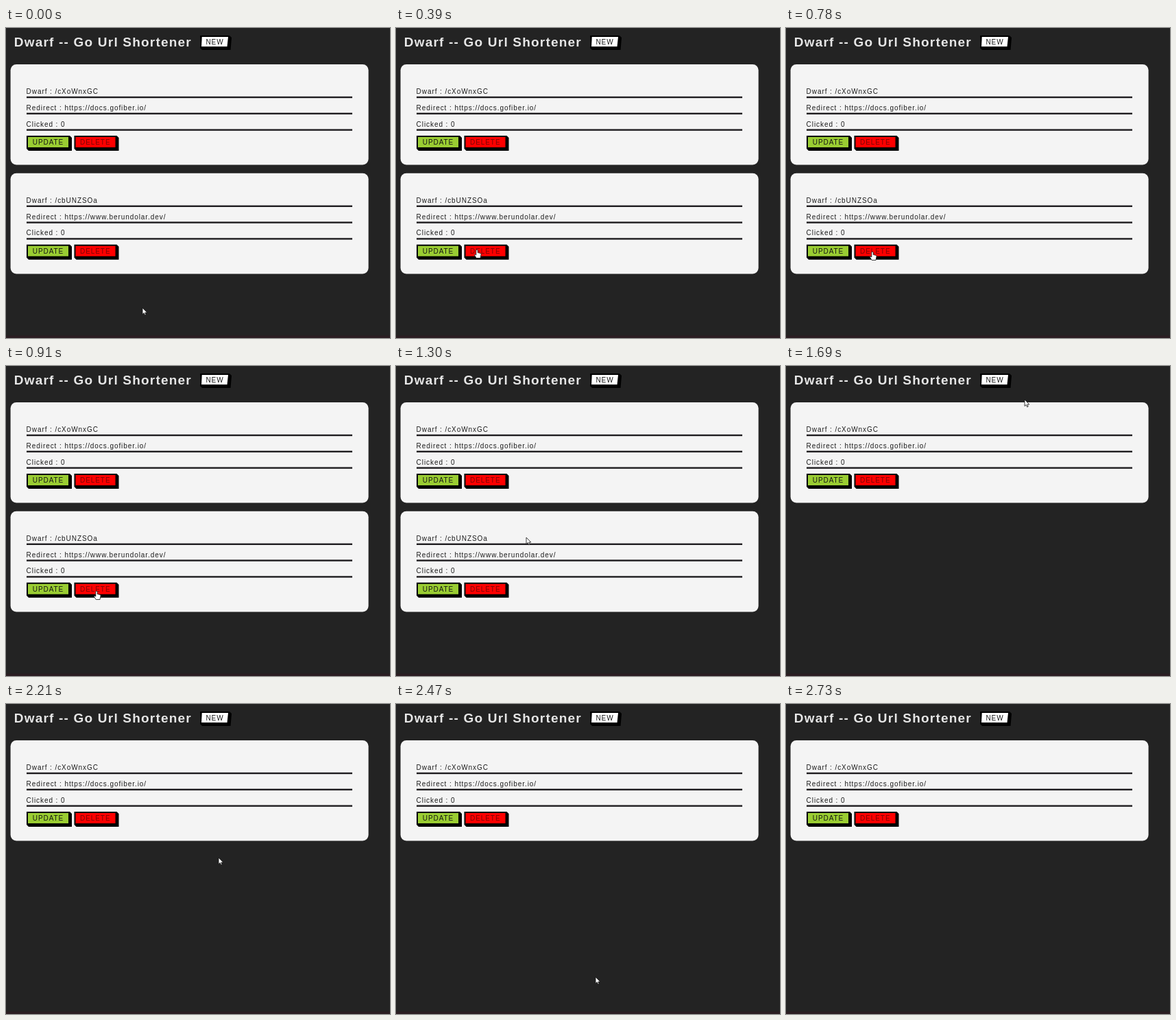
Recreate the animation shown at these times as an HTML page. Size 560 px wide and 452 px high, loop 3120 ms.

```html
<!DOCTYPE html>
<html lang="en">
<head>
<meta charset="utf-8">
<title>Dwarf</title>
<style>
  html, body { margin: 0; width: 100%; height: 100%; overflow: hidden; background: #232323; }
  svg { display: block; width: 560px; height: 452px; font: 10px "Liberation Sans", Arial, sans-serif; letter-spacing: .93px; fill: #1d1d1d; }
  .title { font-size: 19px; font-weight: bold; letter-spacing: 1.2px; fill: #e6e6e6; }
  .card { fill: #f4f4f4; }
  .rule { fill: #1f1d20; }
  .pointer { fill: #fff; stroke: #111; stroke-width: .8; stroke-linejoin: round; }
</style>
</head>
<body>
<svg id="stage" viewBox="0 0 560 452"></svg>
<script>
const LOOP = 3120, STEP = 130, DELETED_AT = 1690;

// Pointer stops: time, x, y, shape; each holds until the next.
const stops = [
  [0, 199, 408, 'arrow'], [130, 176, 382, 'arrow'], [260, 134, 341, 'arrow'],
  [390, 118, 323, 'hand'], [780, 126, 326, 'hand'], [910, 132, 328, 'hand'],
  [1300, 190, 250, 'arrow'], [1430, 310, 98, 'arrow'], [1560, 348, 49, 'arrow'],
  [1950, 344, 75, 'arrow'], [2080, 329, 146, 'arrow'], [2210, 310, 224, 'arrow'],
  [2340, 297, 330, 'arrow'], [2470, 291, 398, 'arrow'], [2600, 289, 440, 'arrow'],
  [2730, 0, 0, '']
];

const text = (x, y, label, attrs = '') => `<text x="${x}" y="${y}" ${attrs}>${label}</text>`;

// A bordered button with a solid block extruded to the lower right.
function button(x, y, width, height, fill, label, labelX, ink = '#151515', slant = 0) {
  const right = x + width, bottom = y + height;
  return `<path d="M${x} ${y}H${right}l3 3L${right + 3 - slant} ${bottom + 3}H${x + 3}l-3 -3z" fill="#000"/>
    <path d="M${x + 2 + slant / 2} ${y + 2}H${right - 2}L${right - 2 - slant} ${bottom - 2}H${x + 2}z" fill="${fill}"/>
    ${text(labelX, y + 13, label, `fill="${ink}"`)}`;
}

function card(id, top, code, address) {
  const rows = [`Dwarf : ${code}`, `Redirect : ${address}`, 'Clicked : 0'];
  const lines = rows.map((row, i) => {
    const y = top + 43 + i * 23.8;
    return text(29.6, y, row) + `<rect class="rule" x="30" y="${y + 3.8}" width="475" height="2.4"/>`;
  });
  return `<g id="${id}">
    <rect class="card" x="6.6" y="${top}" width="522" height="146.6" rx="8.5"/>
    ${lines.join('')}
    ${button(30, top + 104, 63, 19, '#9acd32', 'UPDATE', 38.8)}
    ${button(99.5, top + 104, 62, 19, '#ff0000', 'DELETE', 108, '#760606')}
  </g>`;
}

document.getElementById('stage').innerHTML = `
  <rect width="560" height="452" fill="#232323"/>
  <rect y="448.5" width="560" height="3.5" fill="#2b1d22"/>
  ${text(11.8, 27, 'Dwarf -- Go Url Shortener', 'class="title"')}
  ${button(283, 11, 43, 18, '#fff', 'NEW', 291.4, '#151515', 1.5)}
  ${card('first', 53, '/cXoWnxGC', 'https://docs.gofiber.io/')}
  ${card('second', 211.8, '/cbUNZSOa', 'https://www.berundolar.dev/')}
  <path id="arrow" class="pointer" d="M0 0V9.5L2.2 7.5 3.7 10.8 5.2 10.1 3.8 7H6.8z"/>
  <path id="hand" class="pointer" d="M-1.2 1Q0 -1 1.2 1V4.5L5.2 5.4Q6.4 5.8 6 7.5L5 12.5H-.8L-3.8 7.8Q-3.4 6.2 -1.2 8z"/>`;

const [second, arrow, hand] = ['second', 'arrow', 'hand'].map(id => document.getElementById(id));
const show = (node, on) => node.setAttribute('visibility', on ? 'visible' : 'hidden');

function draw(now) {
  const time = Math.floor((now % LOOP) / STEP) * STEP;
  const [, x, y, shape] = stops.findLast(stop => stop[0] <= time);
  for (const pointer of [arrow, hand]) {
    show(pointer, pointer.id === shape);
    pointer.setAttribute('transform', `translate(${x} ${y})`);
  }
  show(second, time < DELETED_AT);
}

const start = performance.now();
function frame() {
  draw(performance.now() - start);
  requestAnimationFrame(frame);
}
frame();
</script>
</body>
</html>
```
